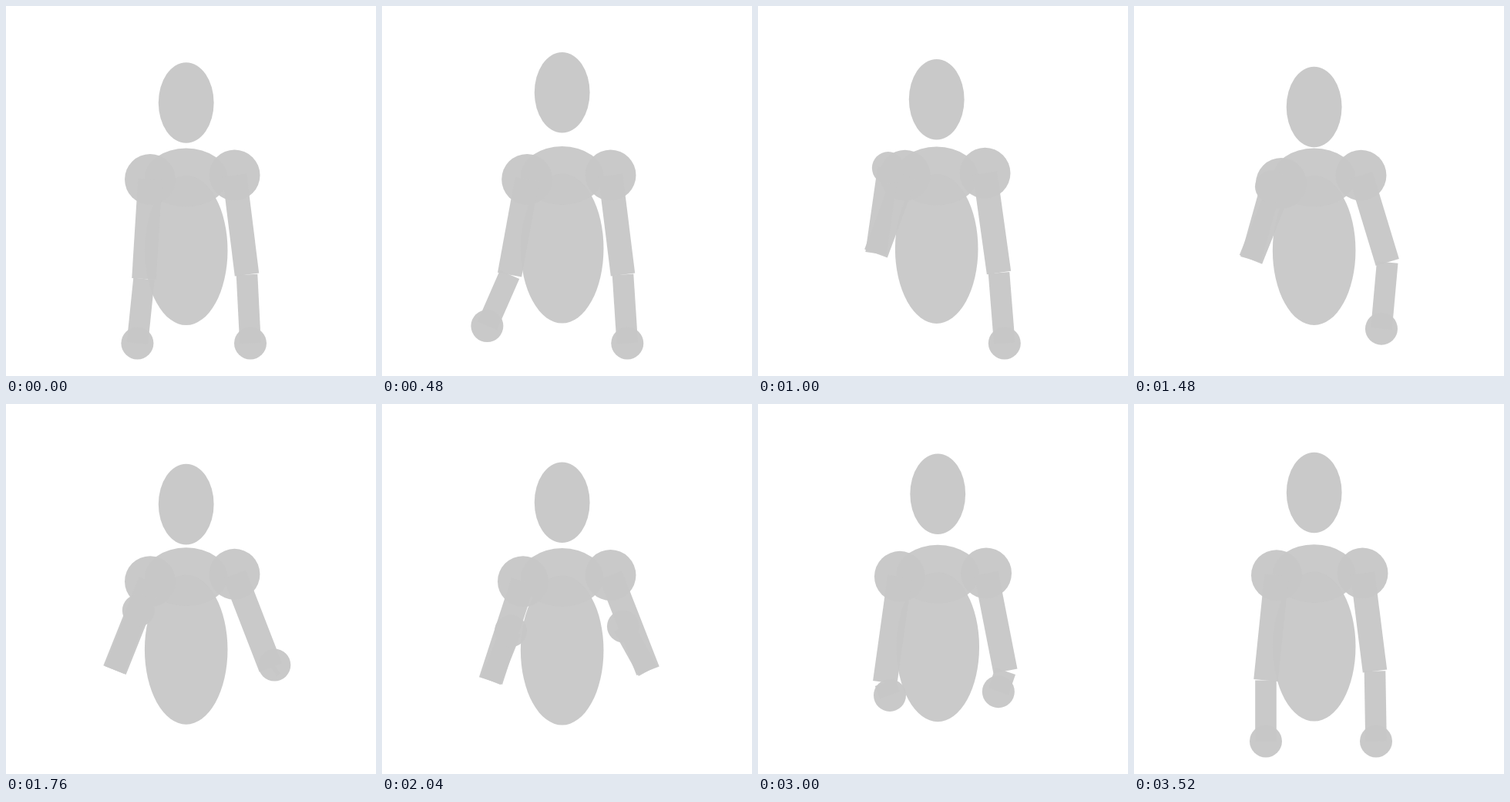
Recreate the animation shown at these times as an HTML page with a canvas. Size 480 by 480 pixels, loop 3.6 s.

```html
<!DOCTYPE html>
<html lang="en">
<head>
<meta charset="utf-8">
<title>Arm curls</title>
<style>
  html, body { margin: 0; width: 100%; height: 100%; overflow: hidden; background: #fff; }
  canvas { display: block; width: 480px; height: 480px; }
</style>
</head>
<body>
<canvas id="stage" width="480" height="480"></canvas>
<script>
const LOOP = 3600, STEP = 40;
const TRUNK = 'rgba(200,200,200,.95)', LIMB = 'rgba(200,200,200,.97)';
const ctx = document.getElementById('stage').getContext('2d');

function oval(x, y, rx, ry, color) {
  ctx.fillStyle = color;
  ctx.beginPath();
  ctx.ellipse(x, y, rx, ry, 0, 0, Math.PI * 2);
  ctx.fill();
}

function limb(from, to, width) {
  ctx.strokeStyle = LIMB;
  ctx.lineWidth = width;
  ctx.beginPath();
  ctx.moveTo(...from);
  ctx.lineTo(...to);
  ctx.stroke();
}

function arm(shoulder, elbow, hand) {
  oval(...shoulder, 33, 33, LIMB);
  limb(shoulder, elbow, 31.6);
  limb(elbow, hand, 27.6);
  oval(...hand, 21, 21, LIMB);
}

function draw() {
  const t = Math.floor(performance.now() % LOOP / STEP) * STEP;
  // ramp eases from 0 to 1 between two times; bell rises to 1 and falls back.
  const ramp = (from, to) => {
    const u = Math.min(1, Math.max(0, (t - from) / (to - from)));
    return u * u * (3 - 2 * u);
  };
  const bell = (center, width) => Math.exp(-(((t - center) / width) ** 2));

  const lift = bell(1000, 250), sink = bell(2040, 350), lower = ramp(2640, 3300);
  const x = 233.7 - 2 * (lift + bell(2640, 300));
  const chestY = 222.5 - 2.5 * ramp(80, 480) + 5 * bell(2040, 670);
  const headY = 125.5 - 13.2 * ramp(80, 480) + 18.7 * ramp(640, 1380) - 16 * ramp(1480, 3400);

  ctx.clearRect(0, 0, 480, 480);
  oval(x, headY, 35.9, 52.3, LIMB);
  oval(x, chestY + 94.5, 53.8, 97, TRUNK);
  oval(x, chestY, 53.8, 37.9, TRUNK);

  // The left arm curls first, swinging its hand outwards on the way up.
  arm(
    [187 + 4 * ramp(80, 1200) - 8 * ramp(1480, 2040) + 2 * ramp(2640, 3400),
      225 - 5.3 * lift + 5.2 * ramp(1000, 1480) - 8 * ramp(2040, 3400)],
    [179 - 26 * ramp(40, 900) - 12 * ramp(1400, 1760) + 30 * ramp(2040, 3400),
      354 - 33 * ramp(300, 1000) + 41 * ramp(1200, 2200) - 3.5 * ramp(2800, 3400)],
    [171 - 37 * bell(550, 270) + 7 * bell(1480, 250) - 4 * bell(2040, 250),
      437.5 - 228 * ramp(350, 1020) + 90 * ramp(1100, 2200) + 138 * lower]
  );

  // The right arm follows, then both hands come down together.
  arm(
    [x + 62.8 - 2 * bell(1480, 150), 219.5 - 2.7 * lift + 2.6 * sink],
    [312.5 + 32.5 * ramp(1100, 1860) - 32.5 * ramp(2400, 3300),
      348.5 - 2 * ramp(480, 1000) - 14 * bell(1480, 260)],
    [317 + 7 * bell(780, 230) + 32 * bell(1740, 180) - 8 * ramp(1700, 2200) + 5 * lower,
      437.5 - 149 * ramp(1320, 2040) + 149 * lower]
  );
  requestAnimationFrame(draw);
}
draw();
</script>
</body>
</html>
```
